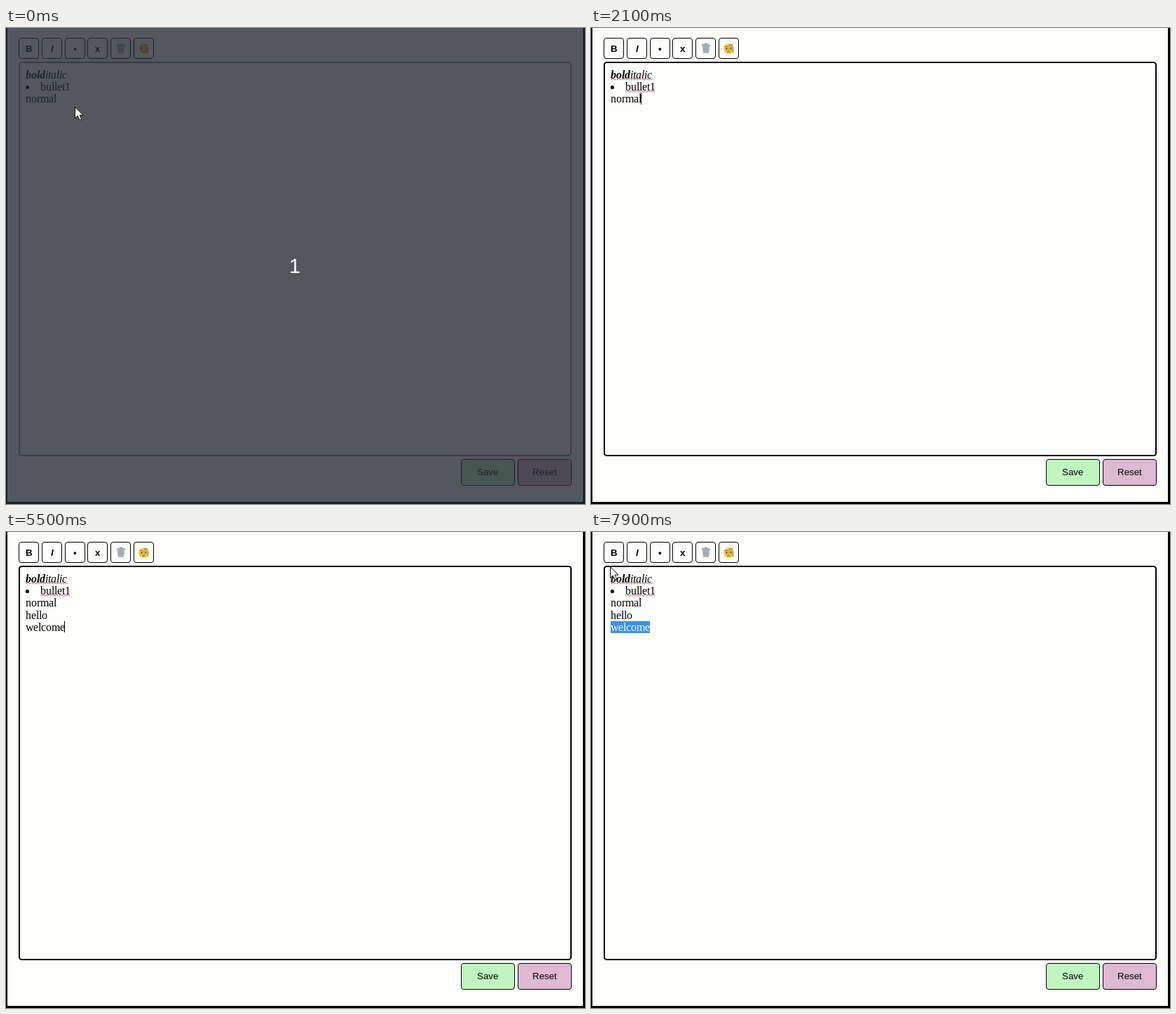
Animation, 826 px wide and 678 px high, one loop 8000 ms. Source, as an HTML page with a canvas:

```html
<!DOCTYPE html>
<html lang="en">
<head>
<meta charset="utf-8">
<title>Rich text editor</title>
<style>
  html, body { margin: 0; width: 826px; height: 678px; overflow: hidden; background: #fefefd; }
  canvas { display: block; }
</style>
</head>
<body>
<canvas id="stage" width="826" height="678"></canvas>
<script>
const ctx = document.getElementById('stage').getContext('2d');
const LOOP = 8000;
const SERIF = '16px "Liberation Serif", "Times New Roman", serif';
const SANS = '13.33px "Liberation Sans", Arial, sans-serif';
const LEFT = 28;
const LINE_TOPS = [58, 75, 92, 110, 127];

const HELLO = { text: 'hello', times: [2800, 2900, 3100, 3200, 3400] };
const WELCOME = { text: 'welcome', times: [4100, 4400, 4500, 4600, 4700, 5000, 5500] };

// Caret hidden intervals; new lines start at 2500 and 3800.
const CARET_OFF = [[0, 700], [1300, 2100], [6100, 6500], [7000, LOOP]];

// [start, shape, x, y]: arrows are placed by the tip, beams by the centre.
const POINTER = [
  [0, 'arrow', 98, 112],
  [100, 'beam', 93.5, 108.5],
  [200, 'beam', 87.5, 103.5],
  [1000, 'beam', 90.5, 102.5],
  [1100, 'arrow', 12, 161],
  [1400, 'none', 0, 0],
  [5900, 'arrow', 16, 192],
  [6000, 'beam', 40.5, 192.5],
  [6100, 'beam', 68.5, 176.5],
  [6200, 'beam', 92.5, 160.5],
  [6300, 'beam', 103.5, 151.5],
  [6500, 'beam', 108.5, 148.5],
  [6600, 'beam', 98.5, 140.5],
  [6700, 'beam', 87.5, 135.5],
  [7000, 'beam', 46.5, 134.5],
  [7100, 'arrow', 12, 132],
  [7400, 'arrow', 10, 126],
  [7500, 'arrow', 11, 110],
  [7600, 'arrow', 14, 90],
  [7700, 'arrow', 20, 66],
  [7800, 'arrow', 29, 44],
  [7900, 'arrow', 27, 49]
];

const ARROW = new Path2D('M.5.8V16.6L4.3 13.1 6.9 19.2 9.7 18 7.1 12.1H12Z');
const BEAM = new Path2D('M-3-8H3V-6L1-5V5L3 6V8H-3V6L-1 5V-5L-3-6Z');

function box(x, y, w, h, fill, stroke = '#000', line = 1) {
  ctx.beginPath();
  ctx.roundRect(x + line / 2, y + line / 2, w - line, h - line, 3.5);
  ctx.fillStyle = fill;
  ctx.fill();
  ctx.strokeStyle = stroke;
  ctx.lineWidth = line;
  ctx.stroke();
}

function disc(x, y, r, fill) {
  ctx.beginPath();
  ctx.arc(x, y, r, 0, Math.PI * 2);
  ctx.fillStyle = fill;
  ctx.fill();
}

function line(color, width, ...points) {
  ctx.beginPath();
  points.forEach(([x, y]) => ctx.lineTo(x, y));
  ctx.strokeStyle = color;
  ctx.lineWidth = width;
  ctx.stroke();
}

function label(text, cx, baseline, style = '') {
  ctx.font = `${style} ${SANS}`;
  ctx.fillStyle = '#000';
  ctx.fillText(text, Math.round(cx - ctx.measureText(text).width / 2), baseline);
}

// Sets glyphs on whole pixels and returns the end of the text.
function write(text, x, top, style = '', color = '#000') {
  ctx.font = `${style} ${SERIF}`;
  ctx.fillStyle = color;
  for (const ch of text) {
    ctx.fillText(ch, x, top + 14);
    x += Math.floor(ctx.measureText(ch).width + 0.01);
  }
  return x;
}

function squiggle(from, to, y) {
  const points = [];
  for (let x = from; x <= to; x += 2) points.push([x, y + (points.length % 2 ? 1.5 : 0)]);
  line('#d8535f', 0.9, ...points);
}

function trashIcon() {
  ctx.beginPath();
  for (const [x, y] of [[158.5, 25], [169.5, 25], [168, 36], [160, 36]]) ctx.lineTo(x, y);
  ctx.closePath();
  ctx.fillStyle = '#b4c0c5';
  ctx.fill();
  for (const dx of [-3, 0, 3]) line('#84949b', 0.8, [164 + dx, 26], [164 + dx * 0.75, 35]);
  line('#84949b', 0.7, [159.5, 30.5], [168.5, 30.5]);
  ctx.beginPath();
  ctx.ellipse(164, 24.3, 6.3, 1.7, 0, 0, Math.PI * 2);
  ctx.fillStyle = '#90a0a7';
  ctx.fill();
  line('#b9c5ca', 1, [159.5, 24], [168.5, 24]);
  line('#788990', 1, [162, 22.5], [166, 22.5]);
}

function faceIcon() {
  disc(196.5, 29.5, 7.3, '#f9c62d');
  disc(193.5, 29.5, 1.2, '#5b4323');
  disc(199.5, 28.5, 2.9, '#e9e2c4');
  disc(199.5, 28.7, 1.2, '#5b4323');
  ctx.beginPath();
  ctx.arc(199.5, 28.5, 3, 0, Math.PI * 2);
  ctx.strokeStyle = '#827452';
  ctx.lineWidth = 0.9;
  ctx.stroke();
  line('#827452', 0.7, [202.3, 29.5], [202.8, 36]);
  line('#6a4c1d', 0.9, [191.3, 27], [193, 26.3], [194.7, 26.8]);
  line('#6a4c1d', 0.9, [197, 24.4], [199.5, 23.4], [202, 24.5]);
  line('#6a4c1d', 1, [193.8, 34.4], [195.8, 33.6], [198, 34]);
}

function drawFrame() {
  ctx.fillStyle = '#000';
  ctx.fillRect(0, 0, 826, 678);
  ctx.fillStyle = '#fefefd';
  ctx.fillRect(2, 0, 821, 675);
}

function drawControls(focused) {
  for (const x of [18, 51, 84, 116, 149, 182]) box(x, 14, 29, 30, '#fefefd');
  label('B', 32.5, 34, 'bold');
  label('I', 65.5, 34, 'italic bold');
  label('•', 98.5, 34, 'bold');
  label('x', 130.5, 34, 'bold');
  trashIcon();
  faceIcon();
  box(18, 48, 789, 562, '#fefefd', focused ? '#000' : '#7f7f7f', 2);
  box(649, 614, 77, 38, '#c0f5c0');
  box(730, 614, 77, 38, '#debad2');
  label('Save', 687.5, 637);
  label('Reset', 768.5, 637);
}

function drawText(t) {
  const typed = ({ text, times }) => text.slice(0, times.filter(at => at <= t).length);
  const [top1, top2, top3, top4, top5] = LINE_TOPS;
  if (t >= 800) {
    squiggle(28, 88, 72.5);
    squiggle(49, 92, 89.7);
  }
  write('italic', write('bold', LEFT, top1, 'italic bold'), top1, 'italic');
  disc(30.5, 84.5, 2.6, '#000');
  write('bullet1', 49, top2);
  const ends = [
    write('normal', LEFT, top3),
    write(typed(HELLO), LEFT, top4),
    write(typed(WELCOME), LEFT, top5)
  ];

  if (!CARET_OFF.some(([from, to]) => t >= from && t < to)) {
    const row = t < 2500 ? 0 : t < 3800 ? 1 : 2;
    const x = t >= 5700 ? ends[row] : Math.max(LEFT, ends[row] - 1);
    ctx.fillStyle = '#000';
    ctx.fillRect(x, LINE_TOPS[row + 2], 1, row ? 16 : 17);
  }
  if (t >= 7000) {
    const from = t < 7100 ? 46 : LEFT;
    ctx.save();
    ctx.beginPath();
    ctx.rect(from, top5, ends[2] - from, 17);
    ctx.clip();
    ctx.fillStyle = '#3a8ff0';
    ctx.fillRect(from, top5, ends[2] - from, 17);
    write(WELCOME.text, LEFT, top5, '', '#fff');
    ctx.restore();
  }
}

function drawCountdown() {
  ctx.fillStyle = 'rgba(36, 41, 50, .78)';
  ctx.fillRect(0, 0, 826, 678);
  ctx.font = '29px "Liberation Sans", Arial, sans-serif';
  ctx.fillStyle = '#fff';
  ctx.fillText('1', 404, 349);
}

function drawPointer(t) {
  const [, shape, x, y] = POINTER.findLast(([start]) => start <= t);
  if (shape === 'none') return;
  const path = shape === 'arrow' ? ARROW : BEAM;
  ctx.save();
  ctx.translate(x, y);
  ctx.fillStyle = '#fff';
  ctx.strokeStyle = '#000';
  ctx.lineWidth = 1;
  ctx.fill(path);
  ctx.stroke(path);
  ctx.restore();
}

function render(t) {
  drawFrame();
  drawControls(t >= 700);
  drawText(t);
  if (t < 100) drawCountdown();
  drawPointer(t);
}

const start = performance.now();
function tick() {
  render((performance.now() - start) % LOOP);
  requestAnimationFrame(tick);
}
tick();
</script>
</body>
</html>
```
